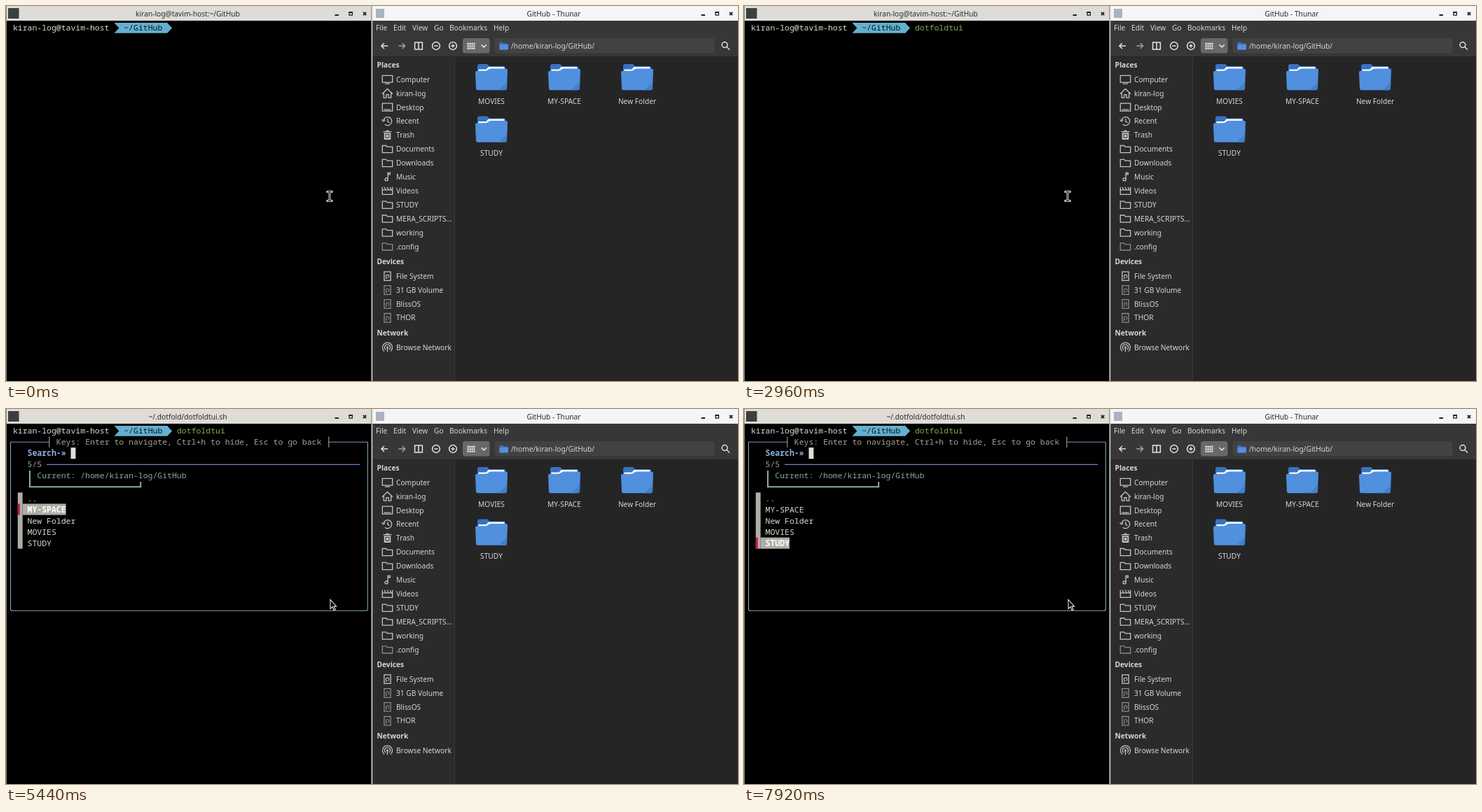
Animation of 1045 by 536 pixels, one loop 8000 ms. Source, as an HTML page:

```html
<!DOCTYPE html>
<html lang="en">
<head>
<meta charset="utf-8">
<title>Terminal and file manager</title>
<style>
  html, body { margin: 0; width: 100%; height: 100%; overflow: hidden; background: #000; }
  svg { display: block; width: 100%; height: 100%; }
  text { white-space: pre; font: 10.2px "Noto Sans", sans-serif; fill: #d6d6d6; }
  .term { font: 11.475px "Noto Sans Mono", monospace; }
  .bold { font-weight: 700; }
  .mid { text-anchor: middle; }
  .line { fill: none; stroke: #c4c4c4; stroke-width: 1.3; }
  .dim { opacity: .62; }
</style>
</head>
<body>
<svg id="stage" viewBox="0 0 1045 536"></svg>
<script>
const USER = 'kiran-log', HOST = 'tavim-host', COMMAND = 'dotfoldtui';
const FILES = ['..', 'MY-SPACE', 'New Folder', 'MOVIES', 'STUDY'];
const CELL = 6.885, ROW = 16.065;

// Drawing helpers
const colX = c => 3 + c * CELL;
const rowY = r => 23 + r * ROW;
const rect = (x, y, w, h, fill, more = '') =>
  `<rect x="${x}" y="${y}" width="${w}" height="${h}" fill="${fill}" ${more}/>`;
const path = (d, more = 'class="line"') => `<path d="${d}" ${more}/>`;
const fillPath = (d, fill) => path(d, `fill="${fill}"`);
const stroke = (d, color, width = 1.1) =>
  path(d, `fill="none" stroke="${color}" stroke-width="${width}"`);
const label = (x, y, s, cls = '', fill = '') =>
  `<text x="${x}" y="${y + 3.7}" class="${cls}" ${fill && `style="fill:${fill}"`}>${s}</text>`;
const term = (row, col, s, fill, cls = '') =>
  `<text x="${colX(col)}" y="${rowY(row) + 12.2}" class="term ${cls}" style="fill:${fill}">${s}</text>`;
const block = (row, col) => rect(colX(col), rowY(row), CELL, ROW, '#dededc');
const at = (x, y, body, cls = '') => `<g transform="translate(${x} ${y})" class="${cls}">${body}</g>`;

// Icons, centred on 0,0
const ICONS = {
  computer: path('M-7.2 -5.6h14.4v9.8h-14.4zM-3.5 6.2h7'),
  home: path('M-7.5 .8L0 -6.4L7.5 .8M-5.2 -.6v6.8h3.6v-4.4h3.2v4.4h3.6v-6.8'),
  desktop: path('M-7.2 -5.6h14.4v11h-14.4zM-5 3.4h10'),
  recent: path('M-5.6 -1.6A6 6 0 1 1 -3.6 4.6M-8 -2.2l2.4 2.4l2.5-2.4M.4 -3.4v3.8l2.8 1.6'),
  trash: path('M-6 -5h12M-2 -6.2h4') + rect(-4.8, -3.3, 9.6, 9.8, '#c4c4c4', 'rx="1"') +
    stroke('M-2.4 -1.2h4.8v5h-4.8z', '#2b2b2c', 1),
  folder: path('M-7.2 -5v10.2h14.4v-8.4h-7.4l-1.6-1.8z'),
  music: path('M.6 3.4v-9.2h3.2v2.4h-3.2') + '<circle cx="-1.4" cy="3.6" r="2" class="line"/>',
  video: path('M-7.2 -1.4h14.4v6.6h-14.4zM-7.2 -1.4v-4M-4.4 -5.4l2 4M-.4 -5.4l2 4M3.6 -5.4l2 4M7.2 -1.4v-4'),
  drive: path('M-4.6 -6.2h9.2v12.6h-9.2z') + stroke('M-2.4 4.2l1.4-2A2.2 2.2 0 1 1 .8 2.4', '#c4c4c4'),
  network: path('M-4.6 5.4A7 7 0 1 1 4.6 5.4M-2.6 3.2A4.1 4.1 0 1 1 2.6 3.2') +
    '<circle r="1.5" fill="#c4c4c4"/>' + path('M0 0v6.4')
};

const bigFolder = (x, y, name) => at(x, y,
  fillPath('M-20 -15.5q0-3 3-3h11l3 3h20q3 0 3 3v8h-40z', '#3872c2') +
  fillPath('M-18.5 -11h11l3-3.5h23v9h-37z', '#fafafa') +
  fillPath('M-23 -6.4q0-2.4 2.6-2.4h12q2.4 0 4-1.6t4-1.6h20.8q2.6 0 2.6 2.4l-1 26q-.2 2.4-2.6 2.4h-38.8q-2.4 0-2.6-2.4z', '#5090de') +
  fillPath('M22.3 7L10.5 18.8h8.9q2.4 0 2.6-2.4z', '#447fcb')) +
  label(x, y + 34.3, name, 'mid');

const windowButtons = x =>
  rect(x - 2.5, 12, 5.5, 2, '#222') +
  stroke(`M${x + 18} 9h4.4v4.2h-4.4z`, '#222', 1.3) + rect(x + 17.4, 8, 5.6, 2, '#222') +
  stroke(`M${x + 38} 8.8l4.2 4.4m0-4.4l-4.2 4.4`, '#222', 1.8);

function fileManager() {
  let s = rect(522, 0, 523, 536, '#252526') +
    rect(523, 0, 522, 21, '#f5f4f6') + rect(528, 4, 12, 13, '#a9b4bd') +
    label(782, 11, 'GitHub - Thunar', 'mid', '#2b2b2b') + windowButtons(995) +
    rect(523, 21, 522, 51, '#373738') + rect(523, 72, 117, 464, '#2b2b2c') +
    rect(523, 72, 522, 1, '#242425') + rect(640, 73, 1, 463, '#393939') +
    rect(521.5, 0, 1.8, 536, '#c8c8c6');

  [[528, 'File'], [553, 'Edit'], [580, 'View'], [611, 'Go'], [633, 'Bookmarks'], [696, 'Help']]
    .forEach(([x, name]) => s += label(x, 31.4, name));

  // Toolbar
  const bright = 'fill="none" stroke="#e4e4e4" stroke-width="1.5"';
  const arrow = 'M-4.6 0h9.2';
  s += at(540.5, 57, path(arrow + 'M-.6 -4l-4 4l4 4', bright)) +
    at(565, 57, path(arrow + 'M.6 -4l4 4l-4 4', bright), 'dim') +
    at(589, 57, path('M-5.4 -5h10.8v10h-10.8zM0 -5v10', bright)) +
    at(614, 57, `<circle r="5.4" ${bright}/>` + path('M-2.6 0h5.2', bright)) +
    at(638, 57, `<circle r="5.4" ${bright}/>` + path('M-2.6 0h5.2M0 -2.6v5.2', bright)) +
    rect(652, 46, 38.5, 21.5, '#686866', 'rx="3.5"') +
    path('M658.5 54h11M658.5 57.3h11M658.5 60.6h11',
      'stroke="#ececec" stroke-width="2.3" stroke-dasharray="2.2 .8"') +
    path('M678.5 55.2l3.7 3.7l3.7-3.7', bright) +
    rect(697.5, 46, 314, 21.5, '#424243', 'rx="3.5"') +
    fillPath('M704.5 52h5l1 1.4h6v8.8h-12z', '#3872c2') + rect(704.5, 55, 12.5, 7.5, '#5090de', 'rx="1"') +
    label(721, 57, `/home/${USER}/GitHub/`) +
    `<circle cx="1026" cy="55.5" r="3.9" ${bright}/>` + path('M1029 58.5l4 4', bright);

  // Side pane
  const heading = (y, name) => label(529.5, y, name, 'bold');
  const entries = (top, list) => list.forEach(([icon, name, dim], i) => {
    const y = top + i * 19.9;
    s += at(544.5, y, ICONS[icon], dim ? 'dim' : '') + label(557, y, name);
  });
  s += heading(84, 'Places') + heading(365, 'Devices') + heading(467, 'Network');
  entries(105, [
    ['computer', 'Computer'], ['home', USER], ['desktop', 'Desktop'], ['recent', 'Recent'],
    ['trash', 'Trash'], ['folder', 'Documents'], ['folder', 'Downloads'], ['music', 'Music'],
    ['video', 'Videos'], ['folder', 'STUDY'], ['folder', 'MERA_SCRIPTS...'],
    ['folder', 'working'], ['folder', '.config', true]
  ]);
  entries(386, [['drive', 'File System'], ['drive', '31 GB Volume', true],
    ['drive', 'BlissOS', true], ['drive', 'THOR', true]]);
  entries(488, [['network', 'Browse Network']]);

  ['MOVIES', 'MY-SPACE', 'New Folder', 'STUDY'].forEach((name, i) =>
    s += bigFolder(693 + i % 3 * 104, 101.5 + (i > 2) * 74.5, name));
  return s;
}

function terminal() {
  const x = colX(22), end = colX(33);
  return rect(0, 0, 522, 536, '#000') + rect(0, 0, 1, 536, '#8c8c8a') +
    rect(1, 0, 520.5, 21, '#dfdcd8') + rect(3, 3, 15.5, 15, '#3b403f') + windowButtons(472) +
    term(0, 1, `${USER}@${HOST}`, '#dadad6') +
    fillPath(`M${x} 24H${end}L${end + CELL} 31.4L${end} 38.8H${x}L${x + CELL} 31.4Z`, '#63b0d0') +
    term(0, 24, '~/GitHub', '#08161c');
}

// Folder picker with one selected entry
function picker(selected) {
  let s = stroke('M6.5 47.2V286q0 2.3 2.3 2.3H514q2.3 0 2.3-2.3V47.2', '#86aab2') +
    stroke('M6 47.2H61.8M460.8 47.2H516.5', '#7f92c8') +
    stroke('M61.8 39.5V55M460.8 39.5V55', '#a5a58c') +
    term(1, 10, 'Keys: Enter to navigate, Ctrl+h to hide, Esc to go back', '#a3a398') +
    term(2, 4, 'Search-»', '#8fb1dc', 'bold') + block(2, 13) +
    term(3, 4, '5/5', '#a5a583') + stroke('M58 79.3H505.5', '#6f7fd0', 1.3) +
    term(4, 6, `Current: /home/${USER}/GitHub`, '#82aca0') +
    stroke('M34 88V111.3H192.2V104', '#86aeae', 2) +
    rect(colX(2), rowY(6), CELL, 5 * ROW, '#aeaea6');
  FILES.forEach((name, i) => {
    const on = i === selected, row = 6 + i;
    if (on) s += rect(colX(3), rowY(row), (name.length + 1) * CELL, ROW, '#aeaea6') +
      rect(colX(2), rowY(row), 3, ROW, '#c4145c');
    s += term(row, 4, name, on ? '#fff' : '#d8d8d4', on ? 'bold' : '');
  });
  return s;
}

// Mouse shapes: light outline around a dark core
const beamLine = 'M459 265.6h6M462 265.6v13M459 278.6h6';
const beam = path(beamLine, 'stroke="#e0e0d8" stroke-width="3" stroke-linecap="square"') +
  stroke(beamLine, '#000', 1);
const pointer = path('M463 272.5v13l3-2.8l2.2 5l2-1l-2.2-4.6h3.6z',
  'fill="#000" stroke="#e8e8e8" stroke-width="1.1"');

const LOOP = 8000, ENTER = 3140;
const within = (t, ...spans) => spans.some(([a, b]) => t >= a && t < b);

function commandLine(t) {
  const n = t < 420 ? 0 : Math.min(10, 1 + Math.floor((t - 420) / 182));
  const done = n === 10, typed = COMMAND.slice(0, n);
  return (within(t, [420, 2780]) ? block(0, 35 + n) : '') +
    (n ? term(0, 35, typed, done ? '#8aa852' : '#ee1424', done ? '' : 'bold') : '') +
    (n && !done ? term(0, 35 + n, COMMAND.slice(n), '#929290') : '');
}

function scene(t) {
  const title = t < ENTER ? `${USER}@${HOST}:~/GitHub` : '~/.dotfold/dotfoldtui.sh';
  let s = label(259.5, 11, title, 'mid', '#2b2b2b') + commandLine(t);
  if (within(t, [5080, 6110])) s += picker(t < 5380 ? 0 : 1);
  else if (t >= 6530) s += picker([7070, 7320, 7740, 7920].filter(m => t >= m).length);
  else if (t >= ENTER && !within(t, [4230, 4720])) s += block(1, 0);
  return s + (within(t, [0, 3630], [6110, 6530]) ? beam : pointer);
}

const stage = document.getElementById('stage');
stage.innerHTML = terminal() + fileManager() + '<g id="live"></g>';
const live = document.getElementById('live');
let last = '';
const start = performance.now();
function frame(now) {
  const next = scene(Math.max(0, now - start) % LOOP);
  if (next !== last) live.innerHTML = last = next;
  requestAnimationFrame(frame);
}
frame(start);
</script>
</body>
</html>
```
